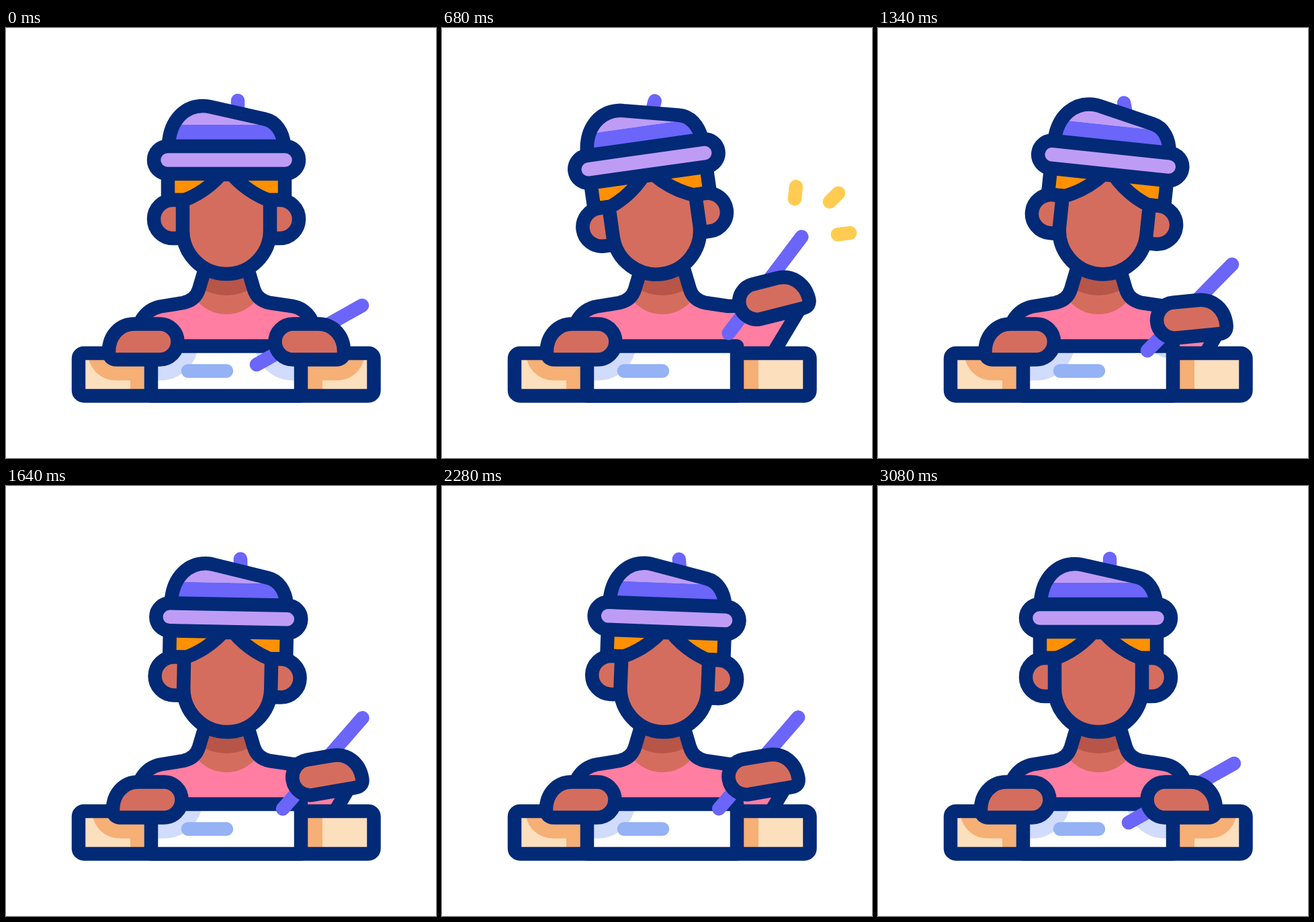
Recreate the animation shown at these times as an HTML page. Size 640x640 px, loop 3.1 s.

```html
<!DOCTYPE html>
<html lang="en">
<head>
<meta charset="utf-8">
<title>Artist at the desk</title>
<style>
  html, body { margin: 0; width: 100%; height: 100%; overflow: hidden; background: #fff; }
  svg { display: block; width: 100vw; height: 100vh; }
  .ink { stroke: #022a76; stroke-width: 20.5; stroke-linejoin: round; }
  .round { stroke-width: 20.5; stroke-linecap: round; }
  .none { fill: none; }
  .skin { fill: #d56d5e; }
  .violet { stroke: #6b65fa; }
  .wood { fill: #f6af74; stroke: #f6af74; }
  .blue { fill: #d1dbfc; stroke: #d1dbfc; }
  .shade { stroke-width: 62; stroke-linejoin: round; }
</style>
</head>
<body>
<svg viewBox="0 0 640 640">
  <defs>
    <path id="hand" d="M-25-26.5H13C35-26.5 51-9 51 14.5Q51 26.5 39 26.5H-25a26.5 26.5 0 0 1 0-53z"/>
    <path id="ear" d="M263 256H248.5a28.5 28.5 0 0 0 0 57H263"/>
    <path id="dome" d="M242 174C244 135 268 116 293 116Q299 116 305 117.5L385 135.5C402 139 412 155 414 174"/>
    <clipPath id="domeClip"><use href="#dome"/></clipPath>
    <clipPath id="woodClip"><rect x="108" y="484" width="439.5" height="63.4"/></clipPath>
    <clipPath id="paperClip"><rect x="216" y="473.5" width="223" height="74"/></clipPath>
  </defs>

  <path id="bodyFill" fill="#ff7ea1"/>
  <path class="skin" d="M298 352H358L369 389L375 402A58 58 0 0 1 281 402L287 389z"/>
  <path fill="#b75549" d="M298 352H358L369 386Q328 410 287 386z"/>
  <path id="bodyLine" class="ink none"/>

  <g id="head">
    <path id="stem" class="round violet" d="M345 108V130"/>
    <rect x="241" y="210" width="174" height="46" fill="#ff9100" class="ink"/>
    <use href="#ear" class="ink skin"/>
    <use href="#ear" class="ink skin" transform="translate(656)scale(-1 1)"/>
    <path class="ink skin" d="M320 218Q296 245 263 257V301a65 65 0 0 0 130 0V257Q360 245 336 218z"/>
    <g clip-path="url(#domeClip)">
      <rect x="230" y="105" width="200" height="39" fill="#be9cf5"/>
      <rect x="230" y="144" width="200" height="40" fill="#6b65fa"/>
    </g>
    <use href="#dome" class="ink none"/>
    <rect class="ink" x="220" y="176" width="216" height="41" rx="20.5" fill="#be9cf5"/>
  </g>

  <rect x="108" y="484" width="439.5" height="63.4" rx="8" fill="#fcdfbd"/>
  <g clip-path="url(#woodClip)" class="wood">
    <path stroke="none" d="M185 484h31v63h-31zM439 484h32v63h-32z"/>
    <use href="#hand" class="shade left"/>
    <use href="#hand" class="shade right"/>
  </g>
  <rect class="ink none" x="108" y="484" width="439.5" height="63.4" rx="8"/>

  <rect x="216" y="473.5" width="223" height="74" fill="#fff"/>
  <g clip-path="url(#paperClip)" class="blue">
    <use href="#hand" class="shade left"/>
    <use href="#hand" class="shade right"/>
  </g>
  <path class="round" stroke="#94b2f4" d="M271 510.5H328"/>
  <rect class="ink none" x="216" y="473.5" width="223" height="74"/>

  <path id="pen" class="round violet" d="M-90 0H90"/>
  <use href="#hand" class="ink skin left"/>
  <use href="#hand" class="ink skin right"/>
  <path id="sparks" class="round none" stroke="#ffcc51"/>
</svg>
<script>
const LOOP = 3100;
const $ = id => document.getElementById(id);
const set = (el, name, value) => el.setAttribute(name, value);
const all = (sel, value) => document.querySelectorAll(sel).forEach(el => set(el, 'transform', value));
const clamp = u => Math.min(1, Math.max(0, u));
const wave = u => (1 - Math.cos(Math.PI * clamp(u))) / 2;

// time, head tilt, hand x, y, angle, pen x, y, angle
const home = [0, 452, 467, 0, 451.5, 457, -29.3];
const keys = [
  [40, ...home],
  [600, -8.5, 494, 399.5, -14.5, 481.5, 381, -53.4],
  [680, -8, 493, 401, -14.2, 481, 382.5, -52.9],
  [1000, 2.5, 470.5, 419.4, -8.3, 466, 405, -46.8],
  [1340, 6, 466.4, 432.6, -5.5, 464, 416, -45.5],
  [1940, -5.7, 495.6, 424.5, -15.6, 483, 408, -53.6],
  [1990, -6.2, 498, 424, -16, 484.5, 407.5, -54],
  [2440, 5.6, 465, 432.6, -5, 463, 417, -45],
  [2620, 3.3, 458.5, 438.7, -1.8, 459, 426.5, -40.7],
  [3080, ...home]
];

// Monotone cubic: flat at turning points, smooth in between
const slope = (i, c) => (keys[i + 1][c] - keys[i][c]) / (keys[i + 1][0] - keys[i][0]);
function tangent(i, c) {
  if (i === 0 || i === keys.length - 1) return 0;
  const a = slope(i - 1, c), b = slope(i, c);
  return a * b > 0 ? 2 * a * b / (a + b) : 0;
}
function pose(t) {
  t = Math.min(keys.at(-1)[0], Math.max(keys[0][0], t));
  const i = Math.max(0, keys.findIndex(k => k[0] >= t) - 1);
  const span = keys[i + 1][0] - keys[i][0], u = (t - keys[i][0]) / span, v = 1 - u;
  return home.map((_, n) => {
    const c = n + 1;
    return v * v * (1 + 2 * u) * keys[i][c] + u * u * (3 - 2 * u) * keys[i + 1][c]
      + span * u * v * (v * tangent(i, c) - u * tangent(i + 1, c));
  });
}

// The forearm keeps its slant; the hand hides the wrist and shoulder end
function bodyPath(x, y) {
  const shoulderX = 453 + (x - 452) * 0.1;
  const shoulderY = Math.max(413, 432 - (467 - y) / 2);
  const elbowX = 485 + (x - 460) * 0.2, wristY = y + 22;
  return 'M200 486L202 434Q212 418 230 414.5L264 409Q282 405 287 389L298 352H358L369 389'
    + 'Q374 405 392 409L426 414'
    + `Q443 ${414 + (shoulderY - 413) * 0.15} ${shoulderX} ${shoulderY}`
    + `L${elbowX + (486 - wristY) * 0.6} ${wristY}L${elbowX} 486z`;
}

function sparkPath(t) {
  const out = clamp((t - 377) / 389);
  const end = -25 + 45.5 * (1 - (1 - out) ** 2);
  const start = -25 + 45.5 * wave((t - 490) / 360);
  if (end - start < 0.3) return '';
  return [[-84, 62], [-44.5, 82], [-7, 71]].map(([deg, r]) => {
    const a = deg * Math.PI / 180;
    const at = d => `${518.5 + (r + d) * Math.cos(a)} ${316 + (r + d) * Math.sin(a)}`;
    return `M${at(start)}L${at(end)}`;
  }).join('');
}

function draw(now) {
  const t = now % LOOP;
  const [tilt, x, y, angle, penX, penY, penAngle] = pose(t);
  const slide = 6.5 * (t < 1400 ? wave((t - 60) / 1340) : wave((2800 - t) / 1400));
  const body = bodyPath(x, y);
  set($('bodyFill'), 'd', body);
  set($('bodyLine'), 'd', body);
  set($('head'), 'transform', `rotate(${tilt} 328 366)`);
  set($('stem'), 'transform', `rotate(${-2.8 * tilt} 345 128)`);
  set($('pen'), 'transform', `translate(${penX} ${penY})rotate(${penAngle})`);
  set($('sparks'), 'd', sparkPath(t));
  all('.left', `translate(${204 + slide} 467)scale(-1 1)`);
  all('.right', `translate(${x} ${y})rotate(${angle})`);
  requestAnimationFrame(loop);
}
const begin = performance.now();
function loop() { draw(performance.now() - begin); }
loop();
</script>
</body>
</html>
```
